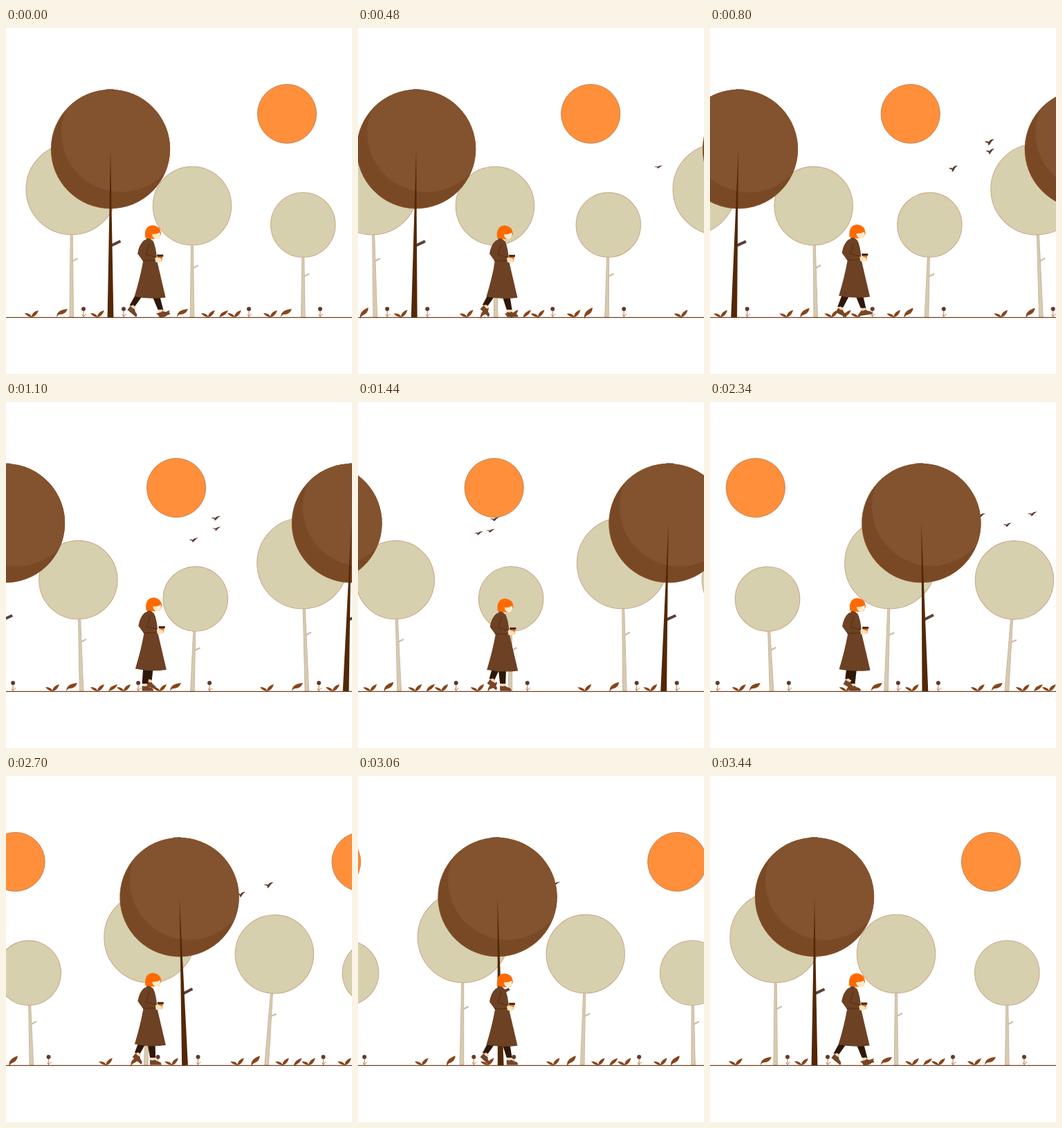
Recreate the animation shown at these times as an HTML page. Size 500 by 500 pixels, loop 3460 ms.

```html
<!DOCTYPE html>
<html lang="en">
<head>
<meta charset="utf-8">
<title>Autumn walk</title>
<style>
  html, body { margin: 0; width: 100%; height: 100%; overflow: hidden; background: #fff; }
  svg { display: block; width: 100%; height: 100%; }
</style>
</head>
<body>
<svg viewBox="0 0 500 500" xmlns="http://www.w3.org/2000/svg">
  <defs>
    <clipPath id="crown"><circle cy="-243" r="86"/></clipPath>
  </defs>
  <g id="scene"></g>
  <path d="M0 418.3H500" stroke="#74401c" stroke-width="1.3"/>
  <g id="plants"></g>
  <g id="legs"></g>
  <g id="body">
    <path fill="#6d4123" d="M206 304L212 307Q217 316 218 336L230.5 389.5Q207 392.5 185.5 388Q194 360 198 337Q195 333 190 326Q192 313 199 307Z"/>
    <path fill="none" stroke="#53290f" stroke-width=".9" d="M207 312Q204 321 202 327L216 331M197 336H215"/>
    <path fill="#ffe2b8" d="M207 300H214L212 308L206 305Z"/>
    <path fill="#6d4123" d="M202 304L207 303L213 309L207 311Z"/>
    <path fill="#ff6a00" d="M201 303Q199 286 212 285Q223 286 224 297L221 304Q211 306 201 303Z"/>
    <path fill="#ffeccb" d="M211 298Q218 298 222.5 295.5V301Q221 305.5 216 305Q211 303 211 298Z"/>
    <g id="cup">
      <path fill="#e07428" d="M218.5 330H226L225 337H219.5Z"/>
      <path fill="#4a210b" d="M218 327.5H227V330.5H218Z"/>
      <path fill="#ffe2b8" d="M215 332Q220 331 225 334L223.5 338.5H216Z"/>
    </g>
  </g>
</svg>
<script>
const NS = "http://www.w3.org/2000/svg";
const LOOP = 3460, SPAN = 3440, WIDTH = 500, GROUND = 418, STEPS = 8;
const TAU = 2 * Math.PI;
const $ = id => document.getElementById(id);

function add(parent, tag, attrs = {}) {
  const el = document.createElementNS(NS, tag);
  for (const k in attrs) el.setAttribute(k, attrs[k]);
  return parent.appendChild(el);
}
const set = (el, value) => el.setAttribute("transform", value);
const mod = (a, n) => ((a % n) + n) % n;
const clamp = s => Math.min(1, Math.max(0, s));
const ease = s => (1 - Math.cos(Math.PI * clamp(s))) / 2;
const wave = (u, peak) => Math.cos(TAU * (u - peak));

// Two copies, one stage width apart, cover the wrap-around.
const movers = [];
function mover(parent, build, pose) {
  const copies = [0, WIDTH].map(shift => {
    const g = add(parent, "g");
    build(g);
    return { g, shift };
  });
  movers.push(u => {
    const p = pose(u), x = mod(p.x + 120, WIDTH) - 120;
    for (const c of copies) set(c.g, `translate(${x + c.shift} ${p.y}) ${p.extra || ""}`);
  });
}
const scroll = (x, u) => x - WIDTH * u;

const scene = $("scene");

mover(scene, g => add(g, "circle", { r: 42.6, fill: "#ff8f3b", stroke: "#c47a48", "stroke-width": .9 }),
  u => ({ x: scroll(406, u), y: 124 }));

// Birds cross the stage twice per loop, each wandering around its own line.
function bird(x, wander, xPeak, y, lift, yPeak, size) {
  mover(scene,
    g => add(g, "path", { d: "M-7 0Q-3 -2 -1 0Q1 -4 7 -4Q3 -1 2 1Q1 4 -2 5Q-1 2 -3 1Z", fill: "#5b382c" }),
    u => ({
      x: x - 2 * WIDTH * u + wander * wave(u, xPeak),
      y: y + lift * wave(u, yPeak),
      extra: `scale(${size} ${size * (.8 + .3 * wave(4 * u, 0))})`
    }));
}
bird(146, 30, .93, 162, 7, .42, 1);
bird(127, 25, .05, 176, 10, .45, .9);
bird(75, 18, .4, 183, 20, .22, .95);

// A tree leans to its first extreme, swings to the second and returns upright.
function lean(u, [t1, v1], [t2, v2]) {
  if (u < t1) return v1 * ease(u / t1);
  if (u < t2) return v1 + (v2 - v1) * ease((u - t1) / (t2 - t1));
  return v2 * ease((1 - u) / (1 - t2));
}
function tree(x, height, first, second, build) {
  mover(scene, build, u => {
    const angle = Math.asin(lean(u, first, second) / height) * 180 / Math.PI;
    return { x: scroll(x, u), y: GROUND, extra: `rotate(${angle})` };
  });
}
function paleTree(x, height, r, twig, first, second) {
  tree(x, height, first, second, g => {
    const edge = { fill: "#d6cbb0", stroke: "#cdb097", "stroke-width": .9 };
    add(g, "path", { d: `M1 ${-twig}L9 ${-twig - 4}`, stroke: "#d3bfa4", "stroke-width": 2.4 });
    add(g, "path", { d: `M-2.8 0L-.8 ${-height}H.8L2.8 0Z`, ...edge });
    add(g, "circle", { cy: -height, r, fill: "#d6d0ae", stroke: "#cda98c", "stroke-width": 1.1 });
  });
}
paleTree(429.3, 133.5, 46.7, 59, [.28, 4.7], [.64, -6.3]);
paleTree(269, 161, 56.7, 71, [.46, -6], [.73, 12.6]);
paleTree(94.7, 185, 65.7, 81, [.25, -7], [.72, 6]);

tree(151, 243, [.34, 8], [.8, -8], g => {
  add(g, "circle", { cy: -243, r: 86, fill: "#794925" });
  add(g, "circle", { cx: 15, cy: -267, r: 86, fill: "#83522e", "clip-path": "url(#crown)" });
  add(g, "circle", { cy: -243, r: 85.8, fill: "none", stroke: "#8f5429", "stroke-width": .7 });
  add(g, "path", { d: "M-6 -329H5", stroke: "#665048", "stroke-width": 1.3 });
  add(g, "path", { d: "M1 -103.5L14.5 -110", stroke: "#5a4038", "stroke-width": 4 });
  add(g, "path", { d: "M-4.4 0L0 -243L4.4 0Z", fill: "#532804" });
});

const plants = $("plants"), leafColor = "#87451b";

function plant(x, build, turn) {
  mover(plants, build, u => ({
    x: scroll(x, u), y: GROUND, extra: `rotate(${turn * (wave(3 * u, 0) - 1)})`
  }));
}
const sprout = g => add(g, "path", {
  d: "M0 -1Q-2 -6 -10 -6Q-7 -1 0 0Q7 -1 10 -10Q1 -8 0 -1Z", fill: leafColor
});
const leaf = g => add(g, "path", {
  d: "M-8 0Q-8 -11 8 -12Q5 -4 -3 -4Q-6 -4 -8 0Z", fill: leafColor
});
const smallLeaf = g => add(g, "path", { d: "M-7 0Q-5 -8 6 -10Q4 -3 -7 0Z", fill: leafColor });
const flower = g => {
  add(g, "path", { d: "M0 -10V0M0 -1L4 -5M0 -1L-2 -4", fill: "none", stroke: "#b77a50", "stroke-width": 1 });
  add(g, "circle", { cy: -12, r: 3, fill: "#65382a" });
};
[37, 132, 227, 292, 330, 382].forEach(x => plant(x, sprout, 2));
[81, 255, 405].forEach(x => plant(x, leaf, 10));
plant(315, smallLeaf, 4);
[112, 170, 351, 454].forEach(x => plant(x, flower, 0));

const legs = [1, 0].map(offset => {
  const g = add($("legs"), "g");
  return {
    offset,
    thigh: add(g, "path", { fill: "#2f1808" }),
    skin: add(g, "path", { d: "M-3 -4H3V1H-3Z", fill: "#f3d2ac" }),
    shoe: add(g, "path", { d: "M-4.5 -1Q0 1 3 -1Q6 2 10 2.5Q12.5 4 12 6.6H-4.5Z", fill: "#754628" })
  };
});

const FRONT = 224, REACH = 41;
// The planted foot slides back with the ground and rolls onto its toe.
function planted(p) {
  const push = ease((p - .65) / .35);
  return { x: FRONT - REACH * p, y: 411 - 6 * push, turn: 40 * push - 18 * clamp(1 - p / .1) };
}
function swinging(p) {
  const arc = Math.sin(Math.PI * p);
  return { x: FRONT - REACH * (1 - ease(p)), y: 405 + 6 * p * p - 2 * arc, turn: 40 - 58 * ease(p) + 14 * arc };
}

function walk(u) {
  const step = u * STEPS, p = step % 1;
  for (const leg of legs) {
    const at = (step + leg.offset) % 2;
    const { x, y, turn } = at < 1 ? planted(at) : swinging(at - 1);
    const knee = 208 + (x - 208) * .3;
    leg.thigh.setAttribute("d", `M${knee - 7} 374H${knee + 6}L${x + 3.5} ${y - 3}L${x - 4.5} ${y - 4}Z`);
    const place = `translate(${x} ${y}) rotate(${turn})`;
    set(leg.skin, place);
    set(leg.shoe, place);
  }
  const rise = 1.4 * (1 - wave(p, .1));
  set($("body"), `translate(${rise * .5} ${.3 - rise})`);
  set($("cup"), `translate(${rise * .5} ${-rise * .4})`);
}

function draw(time) {
  const t = Math.floor((time % LOOP) / 20) * 20;
  const u = Math.min(t, SPAN) / SPAN % 1;
  movers.forEach(move => move(u));
  walk(u);
}

const start = performance.now();
function tick() {
  draw(performance.now() - start);
  requestAnimationFrame(tick);
}
tick();
</script>
</body>
</html>
```
